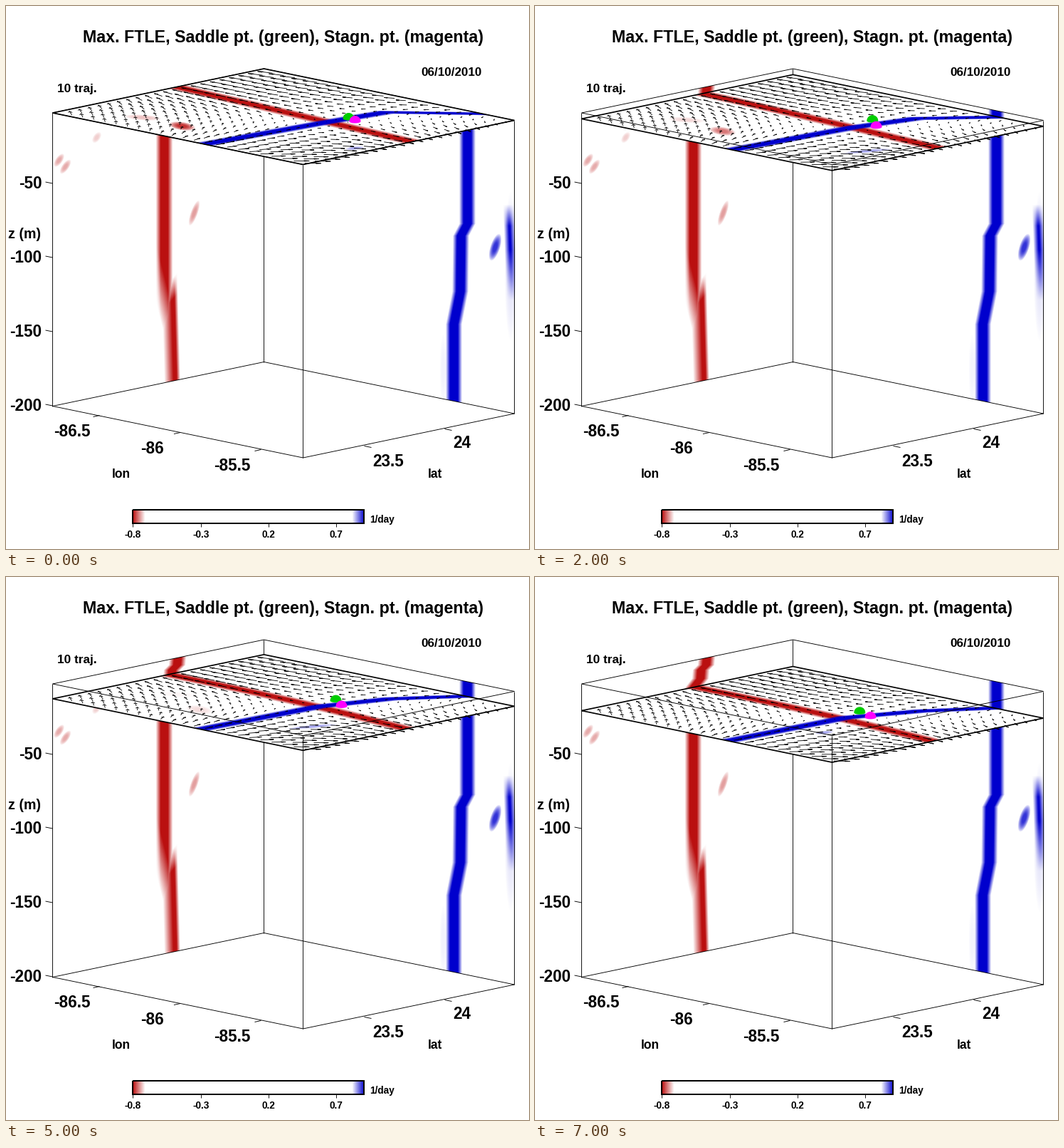
Write a matplotlib script that moves like this. It is 735 px wide and 762 px high and loops after 8 s.

```python
import numpy as np
import matplotlib.pyplot as plt
from matplotlib.animation import FuncAnimation
from matplotlib.collections import LineCollection

W, H, DPI = 735, 762, 64
PT = 72 / DPI  # points per pixel
RED = np.array([186, 16, 16]) / 255
BLUE = np.array([0, 0, 205]) / 255

# Box corner at the top left, and the three edge directions
LEFT = np.array([65, 149.5])
LON = np.array([352, 72.5])
LAT = np.array([297, -62.0])
DROP = np.array([0, 411.5])

X, Y = np.meshgrid(np.arange(W), np.arange(H))


def ramp(a):
    return np.clip(a, 0, 1)


def band(d, half, soft):
    return ramp((half - np.abs(d)) / soft)


def blob(x, y, a, b, angle=0):
    c, s = np.cos(np.radians(angle)), np.sin(np.radians(angle))
    dx, dy = X - x, Y - y
    return ramp(1.1 * (1 - ((dx * c + dy * s) / a) ** 2
                       - ((dy * c - dx * s) / b) ** 2))


def tint(img, amount, color):
    m = ramp(amount)[..., None]
    img[..., :3] = img[..., :3] * (1 - m) + color * m


def sink(k):
    """Pixels the slice has sunk: 2 m a step, faster near the end."""
    return 2.087 * (2 * k + max(0, k - 5) ** 2)


def project(u, v, k):
    u, v = np.asarray(u)[..., None], np.asarray(v)[..., None]
    return LEFT + (0, sink(k)) + u * LON + v * LAT


def red_v(u, k):
    drift = .588 - .0075 * k - (.072 - .002 * k) * u
    return drift + .02 * ramp(k / 5) * np.sin(np.pi * u)


def blue_u(v, k):
    return np.interp(v, [0, .54, .79, 1],
                     [.606 - .003 * k, .64 - .006 * k,
                      .663 + .003 * k, .803 + .069 * np.exp(-k / 1.5)])


def green_spot(k):
    hop = k * np.sin(np.pi * k / 3) ** 2
    return 481 - 4.8 * hop, 157.5 + sink(k) - 7 * np.sin(np.pi * k / 3) ** 2


def magenta_spot(k):
    return max(471, 490 - 5.5 * k), 161.5 + .93 * sink(k)


def wall_image():
    img = np.ones((H, W, 3))

    top = LEFT[1] + LAT[1] / LAT[0] * (X - LEFT[0])
    inside = (X >= 65) & (X <= 362) & (Y >= top) & (Y <= top + DROP[1])
    mid = np.interp(Y, [112, 123, 130, 142, 155], [241, 240, 233, 232, 222])
    upper = band(X - mid, 12, 7) * ramp((422 + 4 * (X - 212) - Y) / 85)
    d = X - np.interp(Y, [380, 525], [233, 237])
    lower = ramp(np.minimum((7.5 - d) / 5, (d + 15) / 13))
    lower = lower * ramp((Y - 370 - 1.2 * (243 - X)) / 30)
    spots = (.2 * blob(127, 184, 9, 5, -55) + .35 * blob(74, 216, 11, 5, -55)
             + .35 * blob(83, 225, 12, 5, -55) + .4 * blob(264, 290, 19, 5, -70))
    tint(img, np.maximum(upper, lower) * inside, RED)
    tint(img, spots * inside, RED)

    top = 87.5 + LON[1] / LON[0] * (X - 362)
    inside = (X >= 362) & (X <= 715) & (Y >= top) & (Y <= top + DROP[1])
    mid = np.interp(Y, [305, 322, 400, 446], [648, 639, 638, 629])
    main = band(X - mid, 11.5, 6)
    side = band(X - np.interp(Y, [285, 410], [706, 711]), 8, 7)
    side = .9 * side * ramp((Y - 278) / 30) * ramp((412 - Y) / 70)
    spots = (.8 * blob(687, 338, 20, 7, -72) + .1 * blob(709, 365, 9, 105)
             + .05 * blob(614, 510, 5, 50))
    tint(img, (main + side + spots) * inside, BLUE)

    bar = (X >= 178) & (X <= 503) & (Y >= 706) & (Y <= 725)
    tint(img, bar * (1 - (X - 178) / 17), RED)
    tint(img, bar * (1 - (503 - X) / 17), BLUE)
    return img


def slice_image(k):
    img = np.ones((H, W, 4))
    s = sink(k)
    dx, dy = X - LEFT[0], Y - LEFT[1] - s
    det = LON[0] * LAT[1] - LON[1] * LAT[0]
    u = (dx * LAT[1] - dy * LAT[0]) / det
    v = (dy * LON[0] - dx * LON[1]) / det
    img[..., 3] = (u >= 0) & (u <= 1) & (v >= 0) & (v <= 1)

    # Faint patches that drift and fade as the slice sinks
    fade = max(0, 1 - k / 6)
    tint(img, .85 * fade * blob(247 + 8 * min(k, 3), 168 + .85 * s, 19, 6, 8), RED)
    tint(img, .25 * fade * blob(192 + 10 * k, 156 + .4 * s, 26, 4, 4), RED)
    tint(img, .35 * blob(490 - 12 * k, 199 + .5 * s,
                         14 + 28 * np.sin(np.pi * k / 7), 2.5, -5), BLUE)

    tint(img, band(v - red_v(u, k), .046, .03), RED)
    tint(img, band(u - blue_u(v, k), .036, .02), BLUE)
    return img


def arrows(k):
    """Saddle flow: out along longitude, in along latitude."""
    u, v = np.meshgrid(np.linspace(.06, .99, 22), np.linspace(.02, .97, 21))
    u, v = u.ravel(), v.ravel()
    off = v - red_v(u, k)
    du = .05 * np.tanh(2.2 * (u - blue_u(v, k)))
    dv = -np.where(off < 0, .045, .022) * np.tanh(2.2 * off)
    tu, tv = u + du, v + dv
    tail, tip = project(u, v, k), project(tu, tv, k)
    a, b = .33, .33
    barb1 = project(tu - a * (du - b * dv), tv - a * (dv + b * du), k)
    barb2 = project(tu - a * (du + b * dv), tv - a * (dv - b * du), k)
    shafts = np.stack([tail, tip], axis=1)
    heads = np.stack([barb1, tip, barb2], axis=1)
    return list(shafts) + list(heads)


def dome(x, y):
    t = np.linspace(0, 2 * np.pi, 60)
    s = np.sin(t)
    return np.column_stack([x + 8 * np.cos(t), y - np.where(s > 0, 8, 2.5) * s])


fig = plt.figure(figsize=(W / DPI, H / DPI), dpi=DPI, facecolor="white")
ax = fig.add_axes([0, 0, 1, 1])
ax.axis("off")


def line(points, z, width=.9):
    x, y = zip(*points)
    return ax.plot(x, y, color="black", lw=width * PT, zorder=z,
                   solid_joinstyle="miter", solid_capstyle="butt")[0]


def label(x, y, text, size, align="left"):
    ax.text(x, y, text, fontsize=size * PT, family="Liberation Sans",
            weight="bold", ha=align, va="baseline", zorder=9)


ax.imshow(wall_image(), zorder=0, interpolation="nearest", aspect="auto")
layer = ax.imshow(slice_image(0), zorder=2, interpolation="nearest",
                  aspect="auto")
ax.set_xlim(-.5, W - .5)
ax.set_ylim(H - .5, -.5)

# Box: edges behind the slice, then those in front of it
front, back, right = LEFT + LON, LEFT + LAT, LEFT + LON + LAT
line([LEFT, back, right], 1)
line([back, back + DROP], 1)
line([LEFT + DROP, back + DROP, right + DROP], 1)
line([LEFT, front, right], 5)
line([LEFT + DROP, front + DROP, right + DROP], 5)
for corner in (LEFT, front, right):
    line([corner, corner + DROP], 5)

# Axis ticks and labels
for i in range(4):
    y = 248.5 + 104 * i
    line([(65, y), (55, y - 2)], 5)
    label(50, 255 + 104.3 * i, str(-50 * (i + 1)), 22.5, "right")
for i, text in enumerate(["-86.5", "-86", "-85.5"]):
    x, y = 131 + 113.5 * i, 574 + 24 * i
    line([(x, y), (x - 9, y + 2)], 5)
    label(x - 39 + i * -.7, y + 29, text, 22.5, "center")
for i, text in enumerate(["23.5", "24"]):
    x, y = 503 + 113 * i, 617 - 24 * i
    line([(x, y), (x + 10, y + 2)], 5)
    label(x + 34 - 9.5 * i, y + 28 - i, text, 22.5, "center")

label(389.5, 51, "Max. FTLE, Saddle pt. (green), Stagn. pt. (magenta)", 23.3,
      "center")
label(72, 121, "10 traj.", 17.3)
label(583, 98, "06/10/2010", 17)
label(3, 325, "z (m)", 19.7)
label(148, 661, "lon", 17.5)
label(592, 662, "lat", 17.5)

# Colour bar
line([(178, 706), (503, 706), (503, 725), (178, 725), (178, 706)], 5, 2)
for i, text in enumerate(["-0.8", "-0.3", "0.2", "0.7"]):
    x = 178 + 95.3 * i
    line([(x, 725), (x, 730)], 5)
    label(x, 746, text, 13.6, "center")
label(511, 724, "1/day", 13.6)

# Moving parts
flow = LineCollection([], colors="black", linewidths=.85 * PT, zorder=3,
                      capstyle="butt")
ax.add_collection(flow, autolim=False)
rim = line([LEFT, front], 4, 1.7)
green, = ax.fill([0], [0], color="#00cd00", lw=0, zorder=6)
magenta, = ax.fill([0], [0], color="#ff00ff", lw=0, zorder=7)


def update(k):
    layer.set_data(slice_image(k))
    flow.set_segments(arrows(k))
    rim.set_data(*project([0, 1, 1, 0, 0], [0, 0, 1, 1, 0], k).T)
    green.set_xy(dome(*green_spot(k)))
    magenta.set_xy(dome(*magenta_spot(k)))
    return layer, flow, rim, green, magenta


anim = FuncAnimation(fig, update, frames=8, interval=1000, repeat=True,
                     init_func=lambda: update(0))
plt.show()
```
